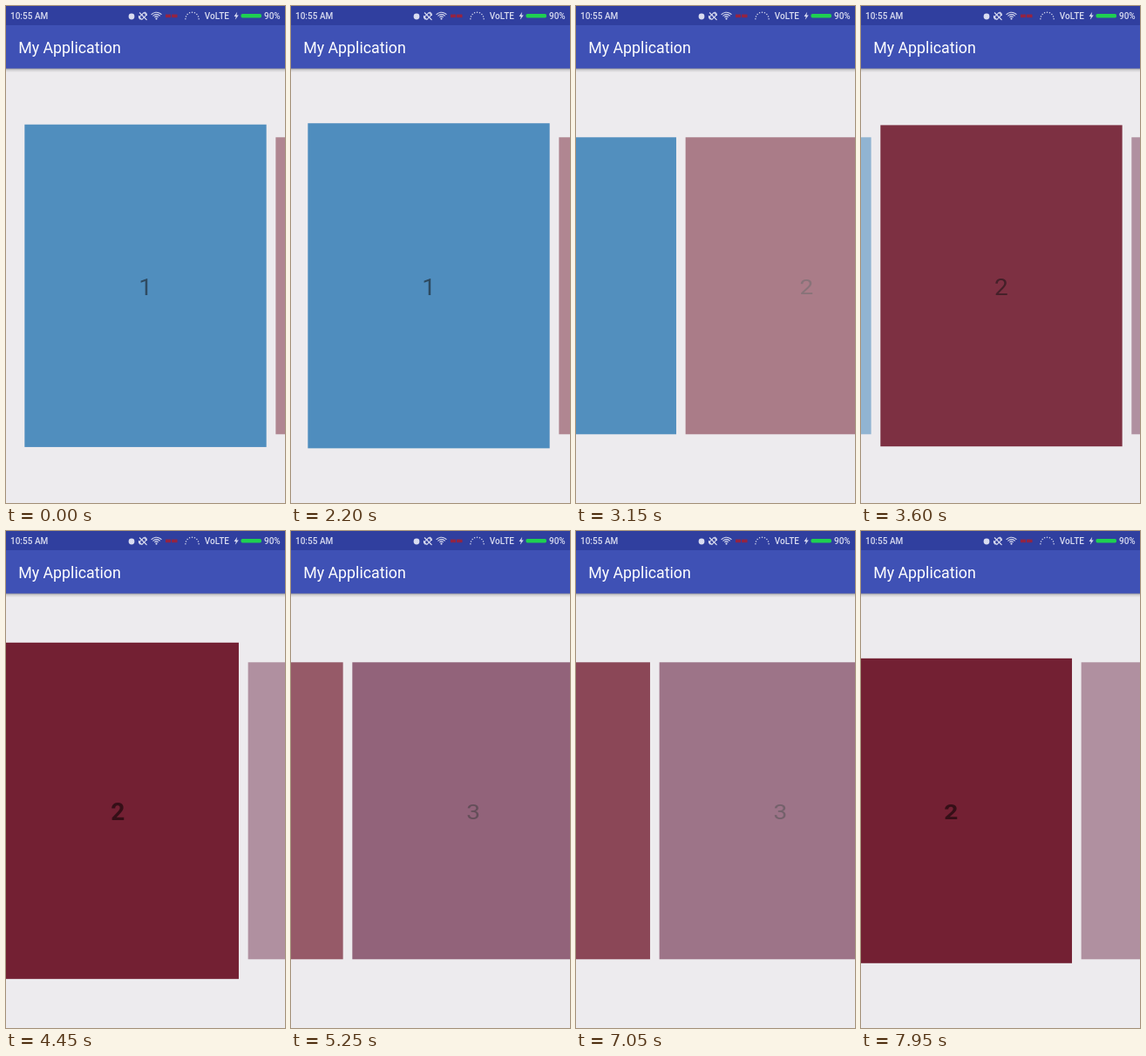
Write an HTML page with a canvas that moves like this. It is 320x569 px and loops after 8000 ms.

```html
<!DOCTYPE html>
<html lang="en">
<head>
<meta charset="utf-8">
<title>Card pager</title>
<style>
  html, body { margin: 0; width: 100%; height: 100%; overflow: hidden; background: #edebee; }
  canvas { display: block; width: 320px; height: 569px; }
</style>
</head>
<body>
<canvas id="stage"></canvas>
<script>
const W = 320, H = 569, LOOP = 8000, STEP = 50;
const canvas = document.getElementById('stage');
const ctx = canvas.getContext('2d');
const dpr = window.devicePixelRatio || 1;
canvas.width = W * dpr;
canvas.height = H * dpr;

const FONT = 'Roboto, "Noto Sans", sans-serif';
const BG = [237, 235, 238];
const CARDS = [[67, 134, 186], [115, 32, 51], [115, 53, 82]];
const CARD_W = 277.33, CARD_H = 400, PAD = 21.33, PITCH = 288, MID_Y = 320.3;

const clamp = (v, lo, hi) => Math.min(hi, Math.max(lo, v));
const mix = (a, b, k) => `rgb(${a.map((v, i) => Math.round(v + (b[i] - v) * k))})`;

// Each swipe: [time, scroll] points of the drag, then an optional snap to a page.
const SWIPES = [
  { drag: [[2150, 0], [2200, 2], [2350, 22], [2700, 89], [3150, 183.7], [3250, 210]], snap: 288 },
  { drag: [[4300, 288], [4350, 293], [4400, 303], [4450, 319.7], [4800, 417], [5250, 527], [5350, 547]], snap: 576 },
  { drag: [[6700, 576], [6750, 573], [6850, 553], [7050, 501.7], [7500, 420], [7950, 344.7], [8000, 337]] }
];

// Monotone cubic through the points.
function curve(pts, t) {
  const slope = i => (pts[i + 1][1] - pts[i][1]) / (pts[i + 1][0] - pts[i][0]);
  const tangent = i => {
    if (i === 0) return 0;
    if (i === pts.length - 1) return slope(i - 1);
    const a = slope(i - 1), b = slope(i);
    return a * b > 0 ? 2 * a * b / (a + b) : 0;
  };
  let i = 0;
  while (i < pts.length - 2 && t > pts[i + 1][0]) i++;
  const h = pts[i + 1][0] - pts[i][0];
  const u = (t - pts[i][0]) / h, u2 = u * u, u3 = u2 * u;
  return (2 * u3 - 3 * u2 + 1) * pts[i][1] + (u3 - 2 * u2 + u) * h * tangent(i)
       + (3 * u2 - 2 * u3) * pts[i + 1][1] + (u3 - u2) * h * tangent(i + 1);
}

function scrollAt(t) {
  const swipe = SWIPES.filter(s => t >= s.drag[0][0]).pop();
  if (!swipe) return 0;
  const [end, from] = swipe.drag[swipe.drag.length - 1];
  if (t <= end) return curve(swipe.drag, t);
  const u = clamp((t - end) / 600, 0, 1);
  return from + (swipe.snap - from) * (1 - (1 - u) ** 5);
}

function text(str, x, y, size, weight, color, align = 'left') {
  ctx.font = `${weight} ${size}px ${FONT}`;
  ctx.textAlign = align;
  ctx.fillStyle = color;
  ctx.fillText(str, x, y);
}

function drawCard(i, scroll) {
  const x = PAD + PITCH * i - scroll;
  if (x > W || x < -CARD_W) return;
  const pos = x / CARD_W;
  const scale = Math.max(0.85, 1 - Math.abs(pos));
  const alpha = clamp(pos < 0 ? 1.5 + pos : 1 - pos, 0.5, 1);
  const color = CARDS[i];
  ctx.save();
  ctx.translate(x, MID_Y);
  ctx.scale(1, scale);
  ctx.fillStyle = mix(BG, color, alpha);
  ctx.fillRect(0, -CARD_H / 2, CARD_W, CARD_H);
  const ink = mix(BG, color.map(v => v * 0.46), alpha);
  text(String(i + 1), CARD_W / 2, 11.4, 28, alpha === 1 ? 700 : 400, ink, 'center');
  ctx.restore();
}

function line(points, close) {
  ctx.beginPath();
  points.forEach(([x, y]) => ctx.lineTo(x, y));
  if (close) ctx.closePath();
}

function drawStatusIcons() {
  const light = '#d9dcf0';
  ctx.fillStyle = ctx.strokeStyle = light;
  ctx.lineWidth = 1.1;

  ctx.beginPath();
  ctx.arc(144, 12, 3.4, 0, 7);
  ctx.fill();

  // silent / vibrate
  ctx.save();
  ctx.translate(157, 11.5);
  ctx.rotate(Math.PI / 4);
  ctx.strokeRect(-2, -3.6, 4, 7.2);
  ctx.restore();
  line([[153, 7.5], [161.5, 16]]);
  ctx.stroke();
  line([[152.5, 11], [152.5, 13.5], [154.5, 15.5]]);
  ctx.stroke();
  line([[159, 7], [161, 8.5], [161.5, 11]]);
  ctx.stroke();

  // wifi
  for (const r of [2.8, 5.2, 7.6]) {
    ctx.beginPath();
    ctx.arc(172.5, 14.8, r, -Math.PI * 0.78, -Math.PI * 0.22);
    ctx.stroke();
  }
  ctx.beginPath();
  ctx.arc(172.5, 14.6, 1.1, 0, 7);
  ctx.fill();

  ctx.fillStyle = '#932443';
  ctx.fillRect(183, 9.6, 6, 3.6);
  ctx.fillRect(190, 9.6, 6.5, 3.6);

  // dotted arc
  ctx.fillStyle = light;
  for (let i = 0; i < 9; i++) {
    const a = Math.PI * (1 + i / 8);
    ctx.beginPath();
    ctx.arc(213.5 + 7.6 * Math.cos(a), 14.8 + 7.6 * Math.sin(a), 0.75, 0, 7);
    ctx.fill();
  }

  // bolt and battery
  line([[265.2, 6.8], [261.6, 12], [263.8, 12], [262.8, 15.8], [266.8, 10.4], [264.4, 10.4]], true);
  ctx.fill();
  ctx.fillStyle = '#1fd051';
  ctx.beginPath();
  ctx.roundRect(269.5, 9, 23.5, 4.4, 1.6);
  ctx.fill();

  text('10:55 AM', 5, 15.4, 10, 500, light);
  text('VoLTE', 227.8, 15.4, 10, 500, light);
  text('90%', 296, 15.4, 10, 500, light);
}

function drawBars() {
  const shade = ctx.createLinearGradient(0, 71.5, 0, 76);
  shade.addColorStop(0, 'rgba(0,0,0,.32)');
  shade.addColorStop(0.4, 'rgba(0,0,0,.12)');
  shade.addColorStop(1, 'rgba(0,0,0,0)');
  ctx.fillStyle = shade;
  ctx.fillRect(0, 71, W, 5);
  ctx.fillStyle = '#3f51b5';
  ctx.fillRect(0, 0, W, 71.5);
  ctx.fillStyle = '#303f9f';
  ctx.fillRect(0, 0, W, 22);
  drawStatusIcons();
  text('My Application', 14.2, 54.3, 17.78, 400, '#fff');
}

function draw(t) {
  ctx.setTransform(dpr, 0, 0, dpr, 0, 0);
  ctx.fillStyle = `rgb(${BG})`;
  ctx.fillRect(0, 0, W, H);
  const scroll = scrollAt(t);
  CARDS.forEach((_, i) => drawCard(i, scroll));
  drawBars();
}

const start = performance.now();
function tick() {
  const t = (performance.now() - start) % LOOP;
  draw(Math.floor(t / STEP) * STEP);
  requestAnimationFrame(tick);
}
tick();
</script>
</body>
</html>
```
